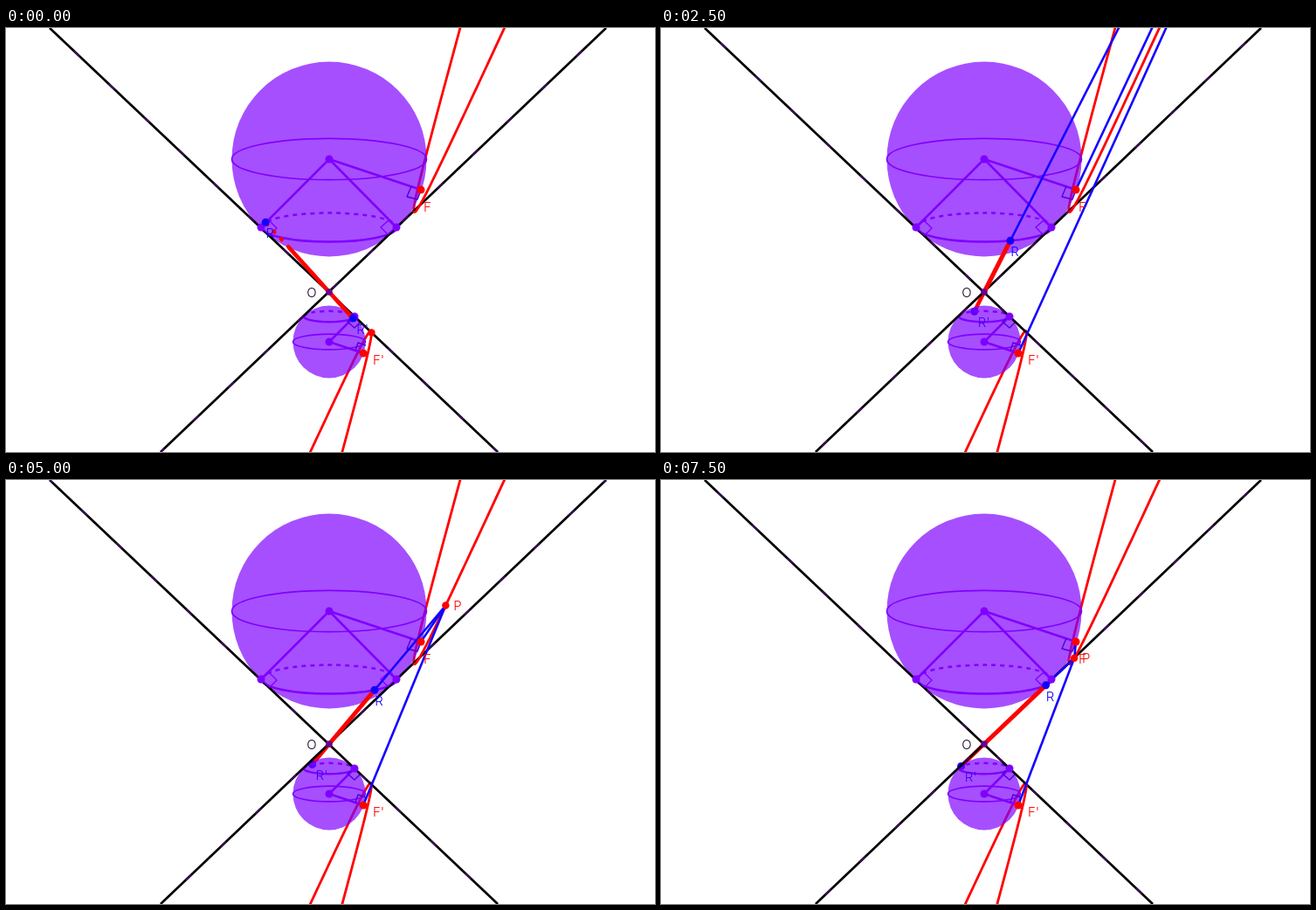
These frames come from a looping animation (743x485 px, 8 s). An HTML page with a canvas:

```html
<!DOCTYPE html>
<html lang="en">
<head>
<meta charset="utf-8">
<title>Spheres in a double cone</title>
<style>
  html, body { margin: 0; width: 100%; height: 100%; overflow: hidden; background: #fff; }
  canvas { display: block; width: 743px; height: 485px; }
</style>
</head>
<body>
<canvas id="stage" width="743" height="485"></canvas>
<script>
const ctx = document.getElementById('stage').getContext('2d');
const RED = '#ff0000', BLUE = '#1400ff', VIOLET = '#7f00ff', DARK = '#5000d8';
const STEP = 500;
// Angle of the moving generator on the tangent circle, one per step
const ANGLES = [200, 69.56, 69.54, 69.35, 68.5, 67.25, 64.6, 61.1, 57, 52.5,
                47.9, 42.8, 37.6, 33, 28.6, 24.5];

const apex = [370, 302], big = [370, 150], small = [370, 359];
const left = [292, 228], right = [447, 228], low = [399, 330];
const F = [475, 185], F2 = [409, 372];
const rad = deg => deg * Math.PI / 180;

const upperPoint = a => [370 + 77.5 * Math.cos(a), 228 + 16.5 * Math.sin(a)];
const lowerPoint = a => [370 - 29 * Math.cos(a), 330 - 6.2 * Math.sin(a)];

// Where the generator at angle a meets the cutting plane
function conic(a) {
  const scale = 1 / (1.2 * Math.cos(a) - 0.02 * Math.sin(a) - 0.4);
  const [x, y] = upperPoint(a);
  return [370 + scale * (x - 370), 302 + scale * (y - 302)];
}

function path(points, color, width = 2.5, dash = [], offset = 0) {
  ctx.beginPath();
  points.forEach(p => ctx.lineTo(p[0], p[1]));
  ctx.strokeStyle = color;
  ctx.lineWidth = width;
  ctx.setLineDash(dash);
  ctx.lineDashOffset = offset;
  ctx.stroke();
}

function ellipse(x, y, rx, ry, from, to, width, dash = []) {
  ctx.beginPath();
  ctx.ellipse(x, y, rx, ry, 0, from, to);
  ctx.strokeStyle = VIOLET;
  ctx.lineWidth = width;
  ctx.setLineDash(dash);
  ctx.stroke();
}

function dot([x, y], color, r = 4.5) {
  ctx.beginPath();
  ctx.arc(x, y, r, 0, 7);
  ctx.fillStyle = color;
  ctx.fill();
}

function label(text, x, y, color) {
  ctx.fillStyle = color;
  ctx.fillText(text, x, y);
}

function arm(from, to) {
  const points = [];
  for (let i = 0; i <= 80; i++) points.push(conic(rad(from + (to - from) * i / 80)));
  path(points, RED, 2.8);
}

function sphere([x, y], r) {
  dot([x, y], 'rgba(127,0,255,.69)', r);
  ellipse(x, y, r, r * 0.212, 0, 2 * Math.PI, 1.7);
}

function tangentCircle(y, rx, ry) {
  ellipse(370, y, rx, ry, 0, Math.PI, 2.5);
  ellipse(370, y, rx, ry, Math.PI, 2 * Math.PI, 2.5, [5, 5]);
}

function cone(step) {
  const shift = Math.max(step, 1) * 17;
  for (const line of [[[50, 0], [563, 485]], [[687, 0], [177, 485]]]) {
    path(line, '#000', 2.7);
    path(line, '#48006c', 1.6, [9, 46], shift);
  }
}

function draw(step) {
  const a = rad(ANGLES[step]);
  const R = upperPoint(a), R2 = lowerPoint(a);
  const behind = step === 0;
  const P = conic(behind ? rad(181) : a);

  ctx.fillStyle = '#fff';
  ctx.fillRect(0, 0, 743, 485);
  ctx.lineJoin = 'round';
  ctx.font = '300 15px Inter, "Liberation Sans", sans-serif';
  ctx.textAlign = 'center';
  ctx.textBaseline = 'alphabetic';

  // Parts behind the spheres
  arm(0, -62);
  arm(180, 82);
  if (!behind) {
    path([apex, R2], RED, 4.5);
    dot(R2, BLUE);
  }

  sphere(big, 111.5);
  sphere(small, 41.5);
  tangentCircle(228, 77.5, 16.5);
  tangentCircle(330, 29, 6.2);
  cone(step);

  path([left, big, right], VIOLET);
  path([big, F], VIOLET);
  path([low, small, F2], VIOLET);
  path([[294, 227], [301, 220], [310, 229], [302, 237], [294, 230]], VIOLET, 1.4);
  path([[445, 227], [438, 220], [429, 228], [437, 236], [445, 229]], VIOLET, 1.4);
  path([[398, 330], [391, 336], [399, 343], [405, 337]], DARK, 1.4);
  path([[464, 181], [459, 193], [471, 196], F], DARK, 1.4);
  path([[400, 369], [403, 360], [412, 363]], DARK, 1.4);

  arm(0, 62);
  arm(180, 268);

  if (behind) {
    const edge = [323, 250];
    path([R, edge], RED, 4, [5, 7]);
    path([edge, apex, R2], RED, 4.8);
  } else {
    path([apex, R], RED, 5);
    for (const from of [R, F, F2]) path([from, P], BLUE, 2.6);
  }

  [big, small, left, right, low].forEach(p => dot(p, VIOLET));
  dot(apex, '#6a0090', 3.8);
  dot(F, RED);
  dot(F2, RED);
  dot(R, BLUE);
  if (behind) dot(R2, BLUE);
  dot(P, RED, 4.2);

  label('O', 350, 308, '#180020');
  label('F', 482.5, 210, RED);
  label('F\'', 426.5, 385, RED);
  label('R', R[0] + 5, R[1] + 18, BLUE);
  label('R\'', R2[0] + 11, R2[1] + 18, '#4000f0');
  if (!behind) label('P', P[0] + 13.5, P[1] + 5, RED);
}

let shown = -1;
function tick(now) {
  const step = Math.floor(now / STEP) % ANGLES.length;
  if (step !== shown) draw(shown = step);
  requestAnimationFrame(tick);
}
draw(shown = 0);
requestAnimationFrame(tick);
</script>
</body>
</html>
```
